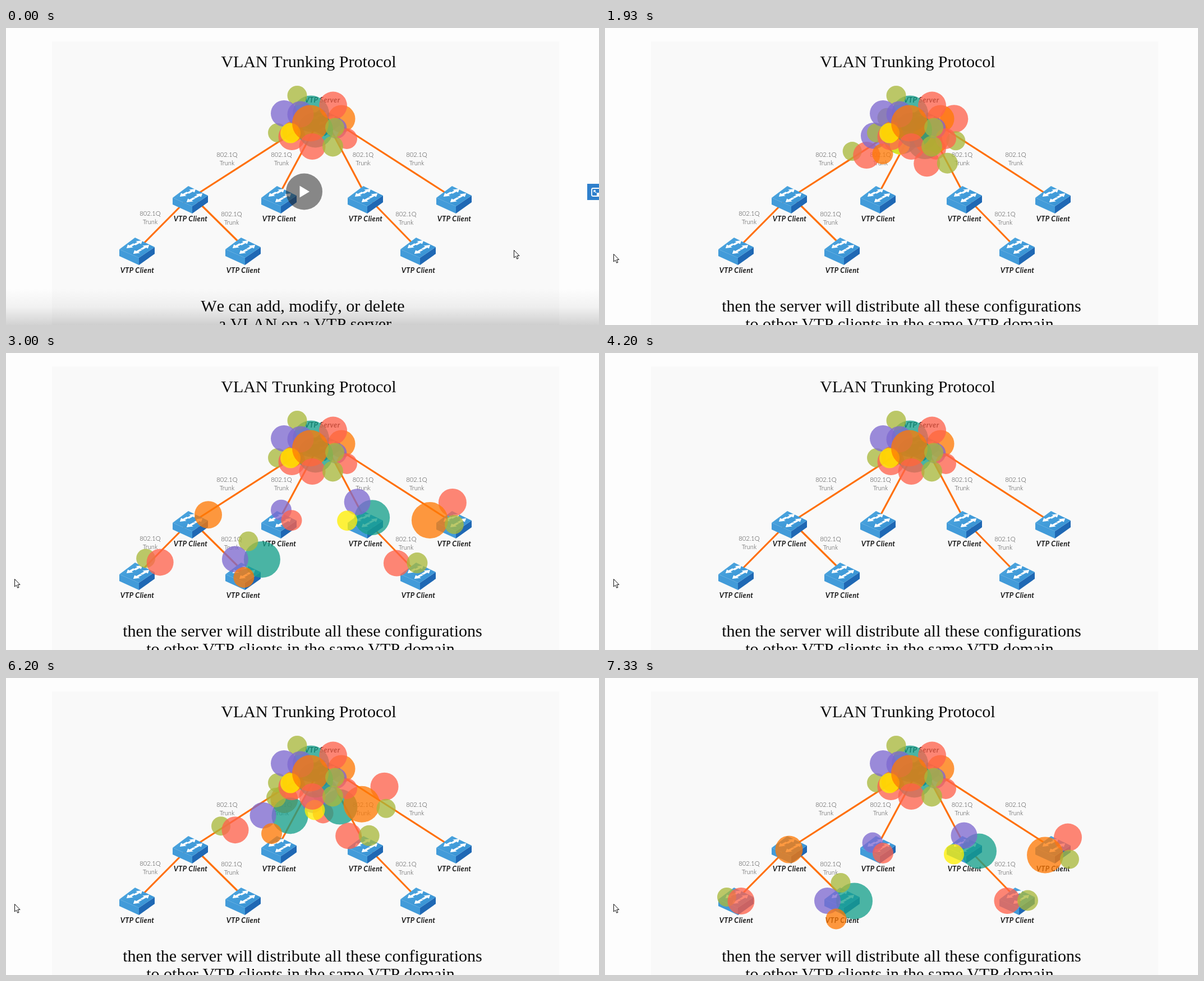
These frames come from a looping animation (1057x530 px, 7.74 s). An HTML page:

```html
<!DOCTYPE html>
<html lang="en">
<head>
<meta charset="utf-8">
<title>VLAN Trunking Protocol</title>
<style>
  html, body { margin: 0; width: 100%; height: 100%; overflow: hidden; background: #fdfdfd; }
  svg { display: block; width: 1057px; height: 530px; }
  text { text-anchor: middle; }
  .serif { font: 30.08px "Liberation Serif", "Times New Roman", serif; font-kerning: none; fill: #0a0a0a; }
  .name { font: italic 700 12.7px Lato, sans-serif; letter-spacing: .4px; fill: #161616; }
  .trunk { font: 300 11.2px Lato, sans-serif; fill: #484848; }
</style>
</head>
<body>
<svg viewBox="0 0 1057 530">
  <defs>
    <linearGradient id="shade" x1="0" y1="0" x2="0" y2="1">
      <stop offset="0" stop-opacity="0"/>
      <stop offset=".5" stop-opacity=".045"/>
      <stop offset="1" stop-opacity=".17"/>
    </linearGradient>
    <linearGradient id="top" x1="0" y1="0" x2="1" y2="1">
      <stop offset="0" stop-color="#4fa8e0"/>
      <stop offset="1" stop-color="#348fd2"/>
    </linearGradient>
    <path id="arrow" d="M-8.5 -2.4H0V-6.5L9 0L0 6.5V2.4H-8.5Z" fill="#fff"/>
    <g id="switch">
      <path d="M-31 -3L4 12V25L-31 9Z" fill="#429bd9"/>
      <path d="M4 12L32 -7V5L4 25Z" fill="#1f68b4"/>
      <path d="M-31 -3L-3 -24L32 -7L4 12Z" fill="url(#top)"/>
      <use href="#arrow" transform="matrix(.8 -.45 .75 .4 3 -15)"/>
      <use href="#arrow" transform="matrix(-.8 .45 .75 .4 -11 -9)"/>
      <use href="#arrow" transform="matrix(.8 -.45 .75 .4 15 -7)"/>
      <use href="#arrow" transform="matrix(-.8 .45 .75 .4 1 1)"/>
    </g>
  </defs>
  <rect width="1057" height="530" fill="#fdfdfd"/>
  <rect x="82" y="24" width="904" height="506" fill="#f9f9f9"/>
  <text class="serif" x="539.5" y="69.5">VLAN Trunking Protocol</text>
  <g id="links" stroke="#ff700c" stroke-width="3.2"></g>
  <g id="nodes"></g>
  <g id="sent"></g>
  <g id="cluster"></g>
  <g id="before" class="serif">
    <text x="529" y="506">We can add, modify, or delete</text>
    <text x="533" y="537.5">a VLAN on a VTP server</text>
  </g>
  <g id="after" class="serif">
    <text x="528.5" y="506">then the server will distribute all these configurations</text>
    <text x="525" y="537.5">to other VTP clients in the same VTP domain</text>
  </g>
  <g id="controls">
    <rect y="465" width="1057" height="65" fill="url(#shade)"/>
    <rect x="1036" y="278" width="21" height="29" fill="#2f80cc"/>
    <rect x="1044" y="286" width="20" height="14" rx="2.5" fill="none" stroke="#fff" stroke-width="1.8"/>
    <path d="M1048 290L1052 294M1048 293V290H1051" fill="none" stroke="#fff" stroke-width="1.3"/>
    <rect x="1053" y="294" width="8" height="6" fill="#fff"/>
  </g>
  <g id="play">
    <circle r="32.5" fill="#222" fill-opacity=".53"/>
    <path d="M-8 -10.5L9.5 0L-8 10.5Z" fill="#fff"/>
  </g>
  <path id="cursor" d="M.5 .5V14L3.6 11.2L5.8 16.2L8 15.2L5.9 10.4H10Z" fill="#fff" stroke="#111" stroke-width="1"/>
</svg>
<script>
const LOOP = 7740, STEP = 200 / 3;
const NS = "http://www.w3.org/2000/svg";
const $ = id => document.getElementById(id);

function add(parent, tag, attrs, text) {
  const el = document.createElementNS(NS, tag);
  for (const k in attrs) el.setAttribute(k, attrs[k]);
  if (text) el.textContent = text;
  parent.appendChild(el);
  return el;
}

const COLOR = { red: "#ff624b", purple: "#7d69d0", teal: "#149f8b",
                orange: "#ff7a04", olive: "#a9b93a", yellow: "#fff000" };

// Each packet travels along one vector: [dx, dy, dots as [colour, x, y, r]]
const PACKETS = [
  [-270, 144, [["orange", 598, 162, 24.5]]],
  [-267, 204, [["olive", 484, 187, 17], ["red", 509.5, 194, 24]]],
  [-99, 245, [["teal", 543.5, 153, 32.5], ["olive", 519, 120.5, 17.5], ["purple", 495.5, 152.5, 23.5], ["orange", 511, 185, 18.5]]],
  [-112, 115, [["purple", 589, 179, 18.5], ["red", 607.5, 197.5, 18.5]]],
  [115, 127, [["teal", 551.5, 182, 31.5], ["purple", 525, 154, 23.5], ["yellow", 507, 187.5, 18]]],
  [242, 146, [["red", 583, 138.5, 25], ["orange", 542.5, 170, 32.5], ["olive", 586, 177.5, 17]]],
  [171, 186, [["red", 546, 211.5, 23.5], ["olive", 582.5, 211, 18.5]]]
];

// Network
const LINKS = [
  [564, 153, 335, 300], [564, 153, 486, 299], [564, 153, 640, 297], [564, 153, 798, 303.5],
  [322, 307, 236, 394], [338, 306, 425, 392], [648, 305.5, 734, 394]
];
for (const [x1, y1, x2, y2] of LINKS) add($("links"), "line", { x1, y1, x2, y2 });

const nodes = $("nodes");
function node(x, y) {
  add(nodes, "use", { href: "#switch", x, y });
}
node(564, 168);
add(nodes, "text", { class: "name", x: 564, y: 132.5 }, "VTP Server");
const CLIENTS = [[328, 306], [486, 306], [640, 306], [798, 306], [233, 398], [422, 398], [734, 398]];
for (const [x, y] of CLIENTS) {
  node(x, y);
  add(nodes, "text", { class: "name", x: x + 1, y: y + 39 }, "VTP Client");
}
const TRUNKS = [[394, 230], [491, 230], [636.5, 230], [732, 230], [257, 335], [402, 336], [713, 336]];
for (const [x, y] of TRUNKS) {
  add(nodes, "text", { class: "trunk", x, y }, "802.1Q");
  add(nodes, "text", { class: "trunk", x, y: y + 15 }, "Trunk");
}

function drawPackets(root) {
  return PACKETS.map(([dx, dy, dots]) => {
    const el = add(root, "g", { "fill-opacity": .76 });
    for (const [c, cx, cy, r] of dots) add(el, "circle", { cx, cy, r, fill: COLOR[c] });
    return { el, dx, dy };
  });
}
drawPackets($("cluster"));
const moving = drawPackets($("sent"));

const ramp = (t, a, b) => Math.min(1, Math.max(0, (t - a) / (b - a)));
const smooth = p => p * p * (3 - 2 * p);
const move = (el, x, y, s = 1) => el.setAttribute("transform", `translate(${x} ${y}) scale(${s})`);
const fade = (el, o) => el.setAttribute("opacity", o);

function draw(ms) {
  const t = Math.floor((ms + 5) / STEP) * STEP;

  const c = smooth(ramp(t, 0, 530));
  move($("cursor"), 905 - 890 * c, 396 + 7 * c);
  const b = ramp(t, 0, 460);
  move($("play"), 531.5, 292, 1 + .64 * b);
  fade($("play"), 1 - b);
  fade($("controls"), 1 - ramp(t, 270, 530));

  const q = ramp(t, 600, 1400), rest = (1 - q) * (1 - q);
  fade($("before"), 1 - ramp(t, 600, 930));
  fade($("after"), ramp(t, 600, 1200));
  move($("after"), -184 * rest, -47 * rest);

  const p = t < 4060 ? ramp(t, 1692, 3179) : ramp(t, 5607, 7175);
  fade($("sent"), p > 0 ? 1 : 0);
  for (const m of moving) move(m.el, m.dx * p, m.dy * p);
}

let start;
function tick(now) {
  if (start === undefined) start = now;
  draw((now - start) % LOOP);
  requestAnimationFrame(tick);
}
draw(0);
requestAnimationFrame(tick);
</script>
</body>
</html>
```
